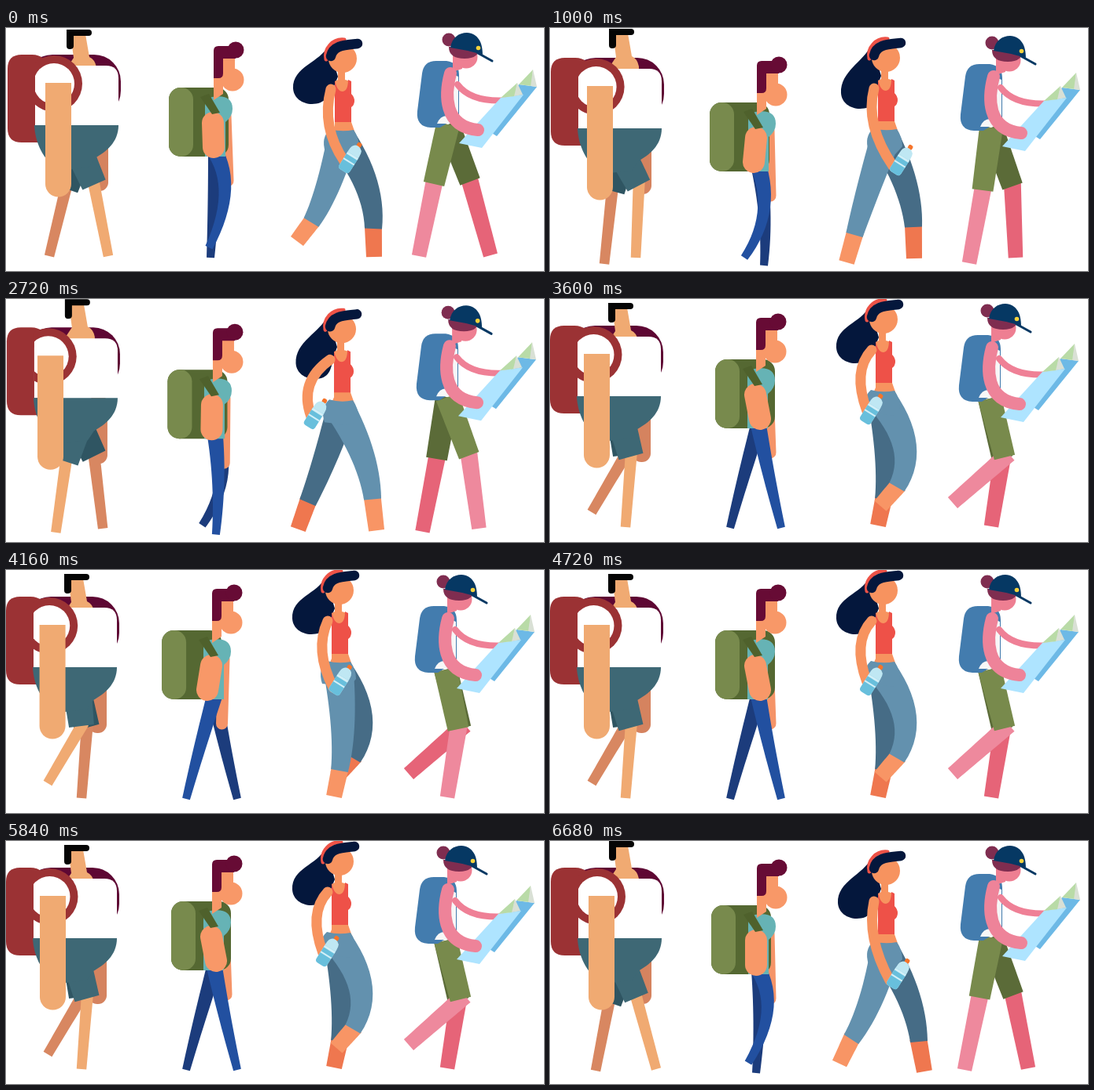
An HTML page for the animation above (6720 ms loop, 684 by 310 pixels).

```html
<!DOCTYPE html>
<html lang="en">
<head>
<meta charset="utf-8">
<title>Four hikers walking</title>
<style>
  html, body { margin: 0; width: 100%; height: 100%; overflow: hidden; background: #fff; }
  svg { display: block; width: 684px; height: 310px; }
  .line { fill: none; stroke-linecap: round; }
</style>
</head>
<body>
<svg viewBox="0 0 684 310">
  <clipPath id="chest"><rect x="36" y="30" width="106" height="94"/></clipPath>

  <!-- Big man with the red pack -->
  <g>
    <g data-move="man-body"><rect x="106" y="120" width="23" height="88" rx="11" fill="#d5835f"/></g>
    <path id="man-far-shin" fill="#d88761"/>
    <path id="man-far-thigh" fill="#2f5562"/>
    <path id="man-near-shin" fill="#f0aa72"/>
    <g data-move="man-body">
      <rect x="24" y="34" width="121" height="80" rx="34" fill="#5e0733"/>
      <path d="M19 34H32Q50 34 50 52V146H19Q1 146 1 128V52Q1 34 19 34Z" fill="#9b3234"/>
    </g>
    <g data-move="man-head">
      <path d="M80 6H99L104 35Q111 38 113 48V62H76V48L84 36Z" fill="#f0aa72"/>
      <path d="M75 0H103Q107 0 107 4T103 8H84V21Q84 25 79 25Q75 25 75 21Z" fill="#050505"/>
    </g>
    <path id="man-near-thigh" fill="#3e6875"/>
    <g data-move="man-body">
      <path d="M36 124V60Q36 48 48 48H126Q142 48 142 64V124Z" fill="#fff"/>
      <path d="M35 124H142C142 146 126 158 112 166L104 178L66 182C46 168 36 146 35 124Z" fill="#3e6875"/>
      <g clip-path="url(#chest)"><g data-move="man-ring">
        <circle cx="60" cy="71" r="36" fill="#9b3234"/>
        <circle cx="60" cy="71" r="26" fill="#fff"/>
      </g></g>
      <g data-move="man-arm"><path d="M49 70H82V199A16.5 16.5 0 0 1 49 199Z" fill="#f0aa72"/></g>
    </g>
  </g>

  <!-- Boy with the green pack -->
  <g>
    <path id="boy-far-leg" fill="#1c3c7c"/>
    <path id="boy-far-arm" class="line" stroke="#f59468" stroke-width="15"/>
    <g data-move="boy-body"><g data-move="boy-pack">
      <rect x="207" y="76" width="76" height="88" rx="15" fill="#556832"/>
      <rect x="207" y="76" width="31" height="88" rx="15" fill="#788a4d"/>
    </g></g>
    <path id="boy-near-leg" fill="#2250a0"/>
    <g data-move="boy-body">
      <path d="M262 88Q288 84 288 103Q288 113 279 120V164H253V100Q253 90 262 88Z" fill="#66b3b5"/>
      <path d="M264 58H276V84L264 92Z" fill="#f89868"/>
      <path d="M274 36H291V70H274Z" fill="#f89868"/>
      <circle cx="288" cy="66" r="14.5" fill="#f89868"/>
      <path d="M270 23H292V39H276V58Q276 64 270 64H264V29Q264 23 270 23Z" fill="#670b35"/>
      <circle cx="292" cy="28" r="10.5" fill="#670b35"/>
    </g>
    <path id="boy-near-arm" class="line" stroke="#f89868" stroke-width="28"/>
    <g data-move="boy-body"><path d="M247 88L258 84L272 108L262 110Z" fill="#4f612c"/></g>
  </g>

  <!-- Woman with the bottle -->
  <g>
    <path id="girl-tail" fill="#04173c"/>
    <path id="girl-far-foot" fill="#ef774f"/>
    <path id="girl-far-leg" fill="#466c86"/>
    <path id="girl-near-foot" fill="#f89565"/>
    <g data-move="girl-body">
      <path d="M418 112H439V120L446 140H412L418 126Z" fill="#f7935f"/>
    </g>
    <path id="girl-near-leg" fill="#6391ae"/>
    <g data-move="girl-body">
      <path d="M412 129Q426 133 442 130Q449 140 449 152L440 162L406 158Q400 140 412 129Z" fill="#6391ae"/>
      <path d="M422 50H431V66L438 68V82H418V68L422 66Z" fill="#f7935f"/>
      <path d="M418 67Q421 81 428 81Q435 80 435 66L439 68V84Q443 88 443 93Q443 98 439 101V120H418Z" fill="#ee5148"/>
      <circle cx="428" cy="39" r="18" fill="#f7935f"/>
      <path d="M407 40A21 21 0 0 1 430 15" class="line" stroke="#ed5247" stroke-width="5"/>
      <path d="M413 36C416 22 430 22 447 20" class="line" stroke="#04173c" stroke-width="12.5"/>
    </g>
    <path id="girl-arm" class="line" stroke="#f7935f" stroke-width="13"/>
    <g id="bottle">
      <rect x="-3" y="-24" width="6" height="6" rx="2" fill="#f6742a"/>
      <path d="M-8 -8Q-8 -19 0 -19Q8 -19 8 -8V14Q8 18 4 18H-4Q-8 18 -8 14Z" fill="#bfe7f3"/>
      <path d="M-8 -6H8V14Q8 18 4 18H-4Q-8 18 -8 14Z" fill="#68bfdc"/>
      <path d="M-8 -6H8V-3H-8ZM-8 3H8V5H-8Z" fill="#d3f0f8"/>
    </g>
  </g>

  <!-- Woman reading the map -->
  <g>
    <path id="guide-far-shin" fill="#e66478"/>
    <path id="guide-far-thigh" fill="#5b6b38"/>
    <path id="guide-near-shin" fill="#ee899d"/>
    <path id="guide-near-thigh" fill="#788a4c"/>
    <g data-move="guide-body">
      <path d="M547 42H560Q576 44 576 60V112L552 127H540Q521 126 523 106L529 58Q531 42 547 42Z" fill="#437cae"/>
      <path d="M562 56L575 62V122H548Q552 112 560 112Z" fill="#f7f7f7"/>
      <path d="M574 72Q592 96 640 92" class="line" stroke="#ef8096" stroke-width="8"/>
    </g>
    <g data-move="guide-head">
      <path d="M568 32H580V52L568 56Z" fill="#ee7f92"/>
      <circle cx="585" cy="37" r="14.5" fill="#ee7f92"/>
      <circle cx="563" cy="15" r="8.5" fill="#7f2d50"/>
      <path d="M563 24H602Q602 39 583 39Q563 39 563 24Z" fill="#7f2d50"/>
      <path d="M565 25C567 12 576 6 586 6C600 7 606 18 606 34Q586 28 565 25Z" fill="#063863"/>
      <path d="M600 32L618 42" class="line" stroke="#063863" stroke-width="3"/>
      <circle cx="600.5" cy="25.500" r="2.800" fill="#f7d23c"/>
    </g>
    <g data-move="guide-body">
      <path d="M652 72L675 75L624 138L616 133Z" fill="#6db9e6"/>
      <path d="M652 72L670 53L668 74Z" fill="#b9dba7"/>
      <path d="M670 53L675 75L667 74Z" fill="#d9e0d5"/>
      <path d="M576 147L629 89L658 85L605 153Z" fill="#aee4ff"/>
      <path d="M629 89L650 70L647 87Z" fill="#b9dba7"/>
      <path d="M650 70L657 85L646 87Z" fill="#d9e0d5"/>
      <path d="M565 58C558 84 556 126 600 130" class="line" stroke="#ee8399" stroke-width="16"/>
    </g>
  </g>
</svg>

<script>
const CYCLE = 1120, HALF = CYCLE / 2, TICK = 40;
const BOB = [0, 200, 240, 440, 520];
const SWING = [0, 240, 500, 760, 1000, 1080];
const STEP = [0, 200, 240, 440, 520, 560, 760, 800, 1000, 1080];

// Smooth periodic curve through rows of values at the given times.
function track(period, times, rows) {
  const n = times.length;
  const key = j => {
    const m = (j + n) % n;
    return { t: times[m] + period * Math.floor(j / n), v: rows[m] };
  };
  return time => {
    const t = time % period;
    let i = n - 1;
    while (times[i] > t) i--;
    const [a, b, c, d] = [i - 1, i, i + 1, i + 2].map(key);
    const span = c.t - b.t, u = (t - b.t) / span, w = 1 - u;
    return b.v.map((p, j) => {
      const q = c.v[j];
      const m = (q - a.v[j]) / (c.t - a.t) * span;
      const k = (d.v[j] - p) / (d.t - b.t) * span;
      return p * (1 + 2 * u) * w * w + m * u * w * w + q * u * u * (3 - 2 * u) - k * u * u * w;
    });
  };
}

// Bob rows: body x, y, then extras (head x, y or hair tip x, y).
const manBob = track(HALF, BOB, [[1, 0, 2, 2], [-2, -3, -2, 1], [-1, 0, -1, 5], [0, 4, 0, 1], [0, 0, 0, 0]]);
const boyBob = track(HALF, BOB, [[0, 0], [-3, -2], [-2, 1], [-1, 19], [-1, 6]]);
const girlBob = track(HALF, BOB, [[0, 0, 388, 77], [-4, -7, 391, 73], [-4, -13, 387, 62], [-1, -1, 393, 83], [-1, -1, 389, 79]]);
const guideBob = track(HALF, BOB, [[0, 0, 0, 0], [-4, 8, -9, 4], [-3, 4, -7, 0], [-1, 4, -1, 4], [-1, 0, -1, 0]]);

const manSwing = track(CYCLE, SWING, [[0], [-5], [-9], [-6], [-2], [0]]);
// pack x, near hand x, far hand x
const boySwing = track(CYCLE, SWING, [[0, 264, 282], [5, 267, 280], [-1, 261, 277], [-7, 256, 274], [-3, 259, 280], [-1, 262, 280]]);
// elbow, hand, bottle
const girlSwing = track(CYCLE, SWING, [
  [411, 125, 430, 170, 438, 167], [395, 98, 403, 143, 409, 142], [386, 110, 388, 150, 394, 148],
  [400, 103, 412, 147, 421, 139], [412, 125, 436, 176, 447, 170], [412, 125, 432, 178, 443, 171]]);

// Step rows: knee, (ankle,) foot.
const manStep = track(CYCLE, STEP, [
  [112, 200, 130, 291], [99, 199, 101, 290], [103, 201, 96, 291], [79, 208, 69, 301], [75, 206, 58, 293],
  [76, 205, 55, 291], [100, 199, 57, 277], [96, 199, 53, 272], [113, 201, 109, 293], [110, 200, 135, 291]]);
const boyStep = track(CYCLE, STEP, [
  [278, 214, 258, 280], [281, 222, 287, 287], [279, 228, 294, 292], [273, 242, 272, 303], [266, 230, 262, 296],
  [264, 225, 260, 293], [249, 225, 231, 291], [246, 228, 229, 292], [271, 237, 247, 293], [276, 220, 252, 283]]);
const girlStep = track(CYCLE, STEP, [
  [408, 205, 388, 248, 370, 272], [426, 196, 402, 228, 371, 242], [451, 188, 441, 240, 420, 264],
  [452, 200, 462, 254, 463, 294], [456, 200, 469, 256, 476, 294], [458, 200, 467, 256, 468, 292],
  [437, 192, 437, 252, 432, 289], [428, 200, 424, 256, 417, 289], [405, 205, 387, 264, 377, 299],
  [407, 205, 383, 253, 368, 284]]);
const guideStep = track(CYCLE, STEP, [
  [544, 199, 525, 291], [563, 198, 514, 264], [578, 202, 512, 260], [588, 202, 592, 293], [589, 197, 608, 290],
  [590, 196, 616, 290], [577, 199, 568, 289], [575, 203, 561, 290], [550, 207, 533, 300], [546, 200, 527, 292]]);

const draw = (id, d) => document.getElementById(id).setAttribute("d", d);
const move = (name, x, y) => document.querySelectorAll(`[data-move="${name}"]`)
  .forEach(g => g.setAttribute("transform", `translate(${x} ${y})`));
const bend = (a, mid, b) => mid.map((m, i) => 2 * m - (a[i] + b[i]) / 2);
const curve = (a, mid, b) => `M${a}Q${bend(a, mid, b)} ${b}`;

// Tapered limb from a to b whose centre line passes through mid.
function limb(a, mid, b, w0, w1) {
  const c = bend(a, mid, b), left = [], right = [], n = 14;
  for (let i = 0; i <= n; i++) {
    const u = i / n, v = 1 - u, r = (w0 * v + w1 * u) / 2;
    const [x, y] = [0, 1].map(k => a[k] * v * v + 2 * c[k] * u * v + b[k] * u * u);
    const [dx, dy] = [0, 1].map(k => (c[k] - a[k]) * v + (b[k] - c[k]) * u);
    const s = r / (Math.hypot(dx, dy) || 1);
    left.push([x - dy * s, y + dx * s]);
    right.unshift([x + dy * s, y - dx * s]);
  }
  return "M" + left.concat(right).join("L") + "Z";
}

// Straight tapered bar, started a little before a so the joint stays closed.
function bar(a, b, w0, w1, extra = 0) {
  const s = extra / Math.hypot(a[0] - b[0], a[1] - b[1]);
  const from = a.map((p, i) => p + (p - b[i]) * s);
  return limb(from, from.map((p, i) => (p + b[i]) / 2), b, w0, w1);
}

const sides = t => [["near", t], ["far", t + HALF]];

function shortsLegs(name, step, hip, t, thigh, shin) {
  for (const [side, time] of sides(t)) {
    const [kx, ky, fx, fy] = step(time);
    draw(`${name}-${side}-thigh`, bar(hip, [kx, ky], ...thigh));
    draw(`${name}-${side}-shin`, bar([kx, ky], [fx, fy], ...shin));
  }
}

function man(t) {
  const [x, y, hx, hy] = manBob(t), [arm] = manSwing(t);
  move("man-body", x, y);
  move("man-head", hx, hy);
  move("man-arm", arm, 0);
  move("man-ring", arm * 0.7, 0);
  shortsLegs("man", manStep, [92 + x, 157 + y], t, [36, 32], [15, 12.5, 5]);
}

function boy(t) {
  const [x, y] = boyBob(t), [pack, hand, far] = boySwing(t);
  move("boy-body", x, y);
  move("boy-pack", pack, 0);
  draw("boy-near-arm", `M${263 + x} ${121 + y}L${hand} ${152 + y}`);
  draw("boy-far-arm", `M${279 + x} ${112 + y}L${far} ${195 + y}`);
  for (const [side, time] of sides(t)) {
    const [kx, ky, fx, fy] = boyStep(time);
    draw(`boy-${side}-leg`, limb([267 + x, 160 + y], [kx, ky], [fx, fy], 20, 10));
  }
}

function girl(t) {
  const [x, y, tx, ty] = girlBob(t), [ex, ey, hx, hy, bx, by] = girlSwing(t);
  const top = [410 + x, 22 + y];
  move("girl-body", x, y);
  draw("girl-tail", `M${top}C${top[0] - 10} ${top[1] + 22} ${tx - 24} ${ty - 28} ${tx - 23} ${ty}` +
    `C${tx - 22} ${ty + 16} ${tx - 4} ${ty + 24} ${tx + 12} ${ty + 18}` +
    `C${tx + 24} ${ty + 12} ${top[0] + 4} ${top[1] + 60} ${top[0] + 12} ${top[1] + 40}Z`);
  draw("girl-arm", curve([413 + x, 78 + y], [ex, ey], [hx, hy]));
  document.getElementById("bottle").setAttribute("transform", `translate(${bx} ${by}) rotate(32)`);
  for (const [side, time] of sides(t)) {
    const [kx, ky, ax, ay, fx, fy] = girlStep(time);
    draw(`girl-${side}-leg`, limb([427 + x, 143 + y], [kx, ky], [ax, ay], 38, 22));
    draw(`girl-${side}-foot`, bar([ax, ay], [fx, fy], 22, 20, 4));
  }
}

function guide(t) {
  const [x, y, hx, hy] = guideBob(t);
  move("guide-body", x, y);
  move("guide-head", hx, hy);
  shortsLegs("guide", guideStep, [562 + x, 123 + y], t, [30, 27], [22, 18.5, 7]);
}

const start = performance.now();
function frame() {
  const t = Math.floor((performance.now() - start) / TICK) * TICK % CYCLE;
  for (const hiker of [man, boy, girl, guide]) hiker(t);
  requestAnimationFrame(frame);
}
frame();
</script>
</body>
</html>
```
